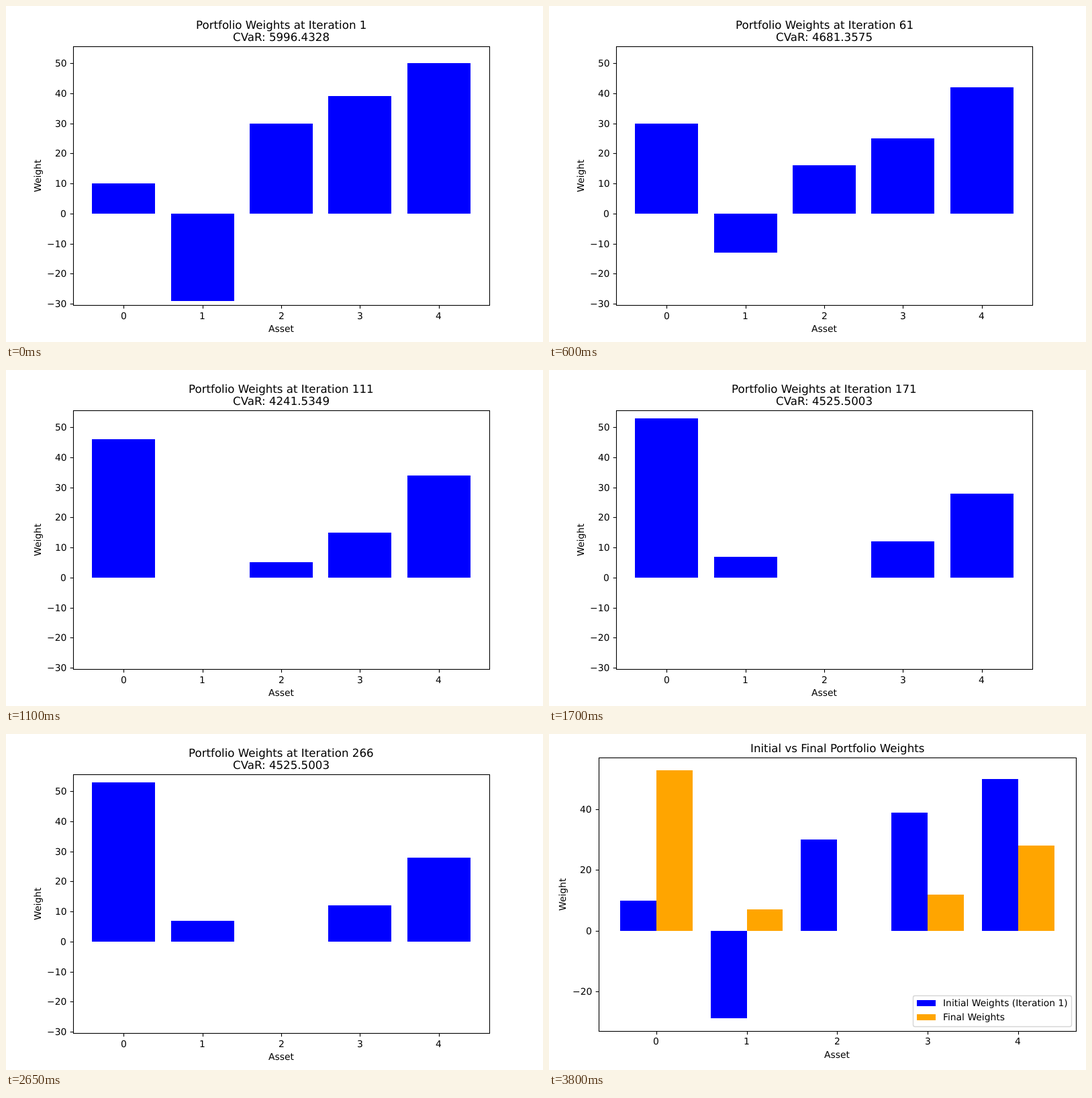
Animation of 800x500 px, one loop 4850 ms. Source, as an HTML page with a canvas:

```html
<!DOCTYPE html>
<html lang="en">
<head>
<meta charset="utf-8">
<title>Portfolio Weights</title>
<style>
html, body { margin: 0; width: 100%; height: 100%; overflow: hidden; background: #fff; }
canvas { display: block; }
</style>
</head>
<body>
<canvas id="stage" width="800" height="500"></canvas>
<script>
const ctx = document.getElementById('stage').getContext('2d');
const LOOP = 4850, STEP = 50, SUMMARY = 3800;
const PT = 100 / 72;
const LABEL = 10 * PT, TITLE = 12 * PT;
const TICK = 3.5 * PT;
const BLUE = '#0000ff', ORANGE = '#ffa500';

// Asset weights at the bends of the optimisation path
const path = [
  { it: 1, w: [10, -29, 30, 39, 50] },
  { it: 61, w: [30, -13, 16, 25, 42] },
  { it: 111, w: [46, 0, 5, 15, 34] },
  { it: 135, w: [53, 7, 0, 12, 28] }
];
const first = path[0], last = path[path.length - 1];

const snap = v => Math.floor(v + 0.5);

function weightsAt(it) {
  if (it >= last.it) return last.w;
  const i = path.findIndex(p => p.it > it);
  const a = path[i - 1], b = path[i];
  const k = (it - a.it) / (b.it - a.it);
  return a.w.map((v, j) => Math.round(v + (b.w[j] - v) * k));
}

// Parabola while descending, then a straight climb to the final value
function cvarAt(it) {
  const start = 5996.4328, mid = 4681.3575, low = 4241.5349, end = 4525.5003;
  if (it >= last.it) return end;
  if (it > 111) return low + (end - low) * (it - 111) / (last.it - 111);
  const slope = (mid - start) / 60;
  const bend = ((low - mid) / 50 - slope) / 110;
  return start + (it - 1) * (slope + (it - 61) * bend);
}

function text(str, x, y, size, align = 0.5) {
  ctx.font = size + 'px "DejaVu Sans", sans-serif';
  ctx.fillStyle = '#000';
  ctx.fillText(str, Math.round(x - ctx.measureText(str).width * align), y);
}

function line(x1, y1, x2, y2) {
  ctx.beginPath();
  ctx.moveTo(x1, y1);
  ctx.lineTo(x2, y2);
  ctx.stroke();
}

function makeAxes(left, right, top, bottom, yMin, yMax) {
  const ux = (right - left) / 5.28, uy = (bottom - top) / (yMax - yMin);
  return {
    left, right, top, bottom,
    x: v => left + (v + 0.64) * ux,
    y: v => bottom - (v - yMin) * uy
  };
}

function drawBars(ax, weights, from, to, color) {
  const base = snap(ax.y(0));
  ctx.fillStyle = color;
  weights.forEach((w, i) => {
    const x = snap(ax.x(i + from));
    ctx.fillRect(x, base, snap(ax.x(i + to)) - x, snap(ax.y(w)) - base);
  });
}

function drawAxes(ax, ticks, pos) {
  const l = snap(ax.left) + 0.5, r = snap(ax.right) + 0.5;
  const t = snap(ax.top) + 0.5, b = snap(ax.bottom) + 0.5;
  ctx.strokeStyle = '#000';
  ctx.lineWidth = 0.8 * PT;
  for (let i = 0; i < 5; i++) {
    const x = snap(ax.x(i)) + 0.5;
    line(x, b, x, b + TICK);
    text(String(i), ax.x(i), pos.tickBase, LABEL);
  }
  for (const v of ticks) {
    const y = snap(ax.y(v)) + 0.5;
    line(l, y, l - TICK, y);
    text(String(v).replace('-', '\u2212'), ax.left - 2 * TICK, Math.round(ax.y(v) + 5), LABEL, 1);
  }
  ctx.strokeRect(l, t, r - l, b - t);
  text('Asset', (ax.left + ax.right) / 2, pos.xBase, LABEL);
  ctx.save();
  ctx.translate(pos.yBase, Math.round((ax.top + ax.bottom) / 2));
  ctx.rotate(-Math.PI / 2);
  text('Weight', 0, 0, LABEL);
  ctx.restore();
}

function drawLegend() {
  ctx.beginPath();
  ctx.roundRect(542.5, 389.5, 236, 46, 2.78);
  ctx.fillStyle = 'rgba(255,255,255,0.8)';
  ctx.fill();
  ctx.strokeStyle = 'rgba(204,204,204,0.8)';
  ctx.lineWidth = PT;
  ctx.stroke();
  [['Initial Weights (Iteration 1)', BLUE, 405], ['Final Weights', ORANGE, 426]].forEach(([label, color, y]) => {
    ctx.fillStyle = color;
    ctx.fillRect(548, y - 9, 28, 9);
    text(label, 587, y, LABEL, 0);
  });
}

const runAxes = makeAxes(100, 720, 60, 445, -30.45, 55.65);
const endAxes = makeAxes(73.6, 785, 35.25, 441.78, -33.1, 57.1);

function drawRun(it) {
  drawBars(runAxes, weightsAt(it), -0.4, 0.4, BLUE);
  drawAxes(runAxes, [-30, -20, -10, 0, 10, 20, 30, 40, 50], { tickBase: 466, xBase: 485, yBase: 52 });
  text('Portfolio Weights at Iteration ' + it, 410, 34, TITLE);
  text('CVaR: ' + cvarAt(it).toFixed(4), 410, 52, TITLE);
}

function drawSummary() {
  drawBars(endAxes, first.w, -0.4, 0, BLUE);
  drawBars(endAxes, last.w, 0, 0.4, ORANGE);
  drawAxes(endAxes, [-20, 0, 20, 40], { tickBase: 462, xBase: 482, yBase: 25 });
  text('Initial vs Final Portfolio Weights', 429.3, 27, TITLE);
  drawLegend();
}

function render(ms) {
  const t = ms % LOOP;
  ctx.fillStyle = '#fff';
  ctx.fillRect(0, 0, 800, 500);
  if (t < SUMMARY) drawRun(1 + 5 * Math.floor(t / STEP));
  else drawSummary();
}

ctx.textRendering = 'geometricPrecision';
const origin = performance.now();
function tick() {
  render(performance.now() - origin);
  requestAnimationFrame(tick);
}
tick();
</script>
</body>
</html>
```
